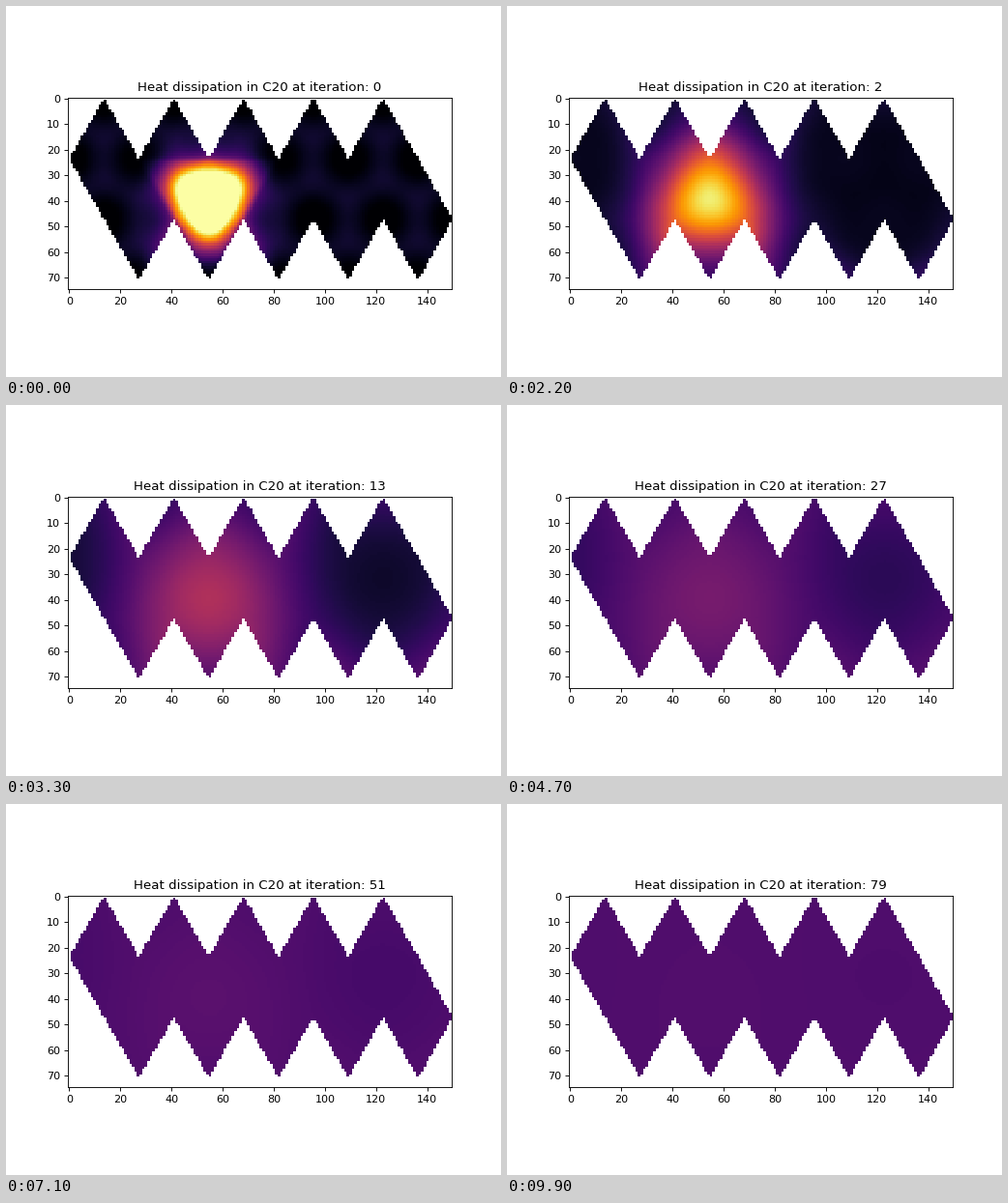
Recreate the animation shown at these times as a matplotlib script. Size 512 px wide and 384 px high, loop 10 s.

```python
import numpy as np
import matplotlib.pyplot as plt
from matplotlib.animation import FuncAnimation

W, H = 150, 75
HOLD, STEPS = 20, 80
SIDE = W / 5.5
ROW = SIDE * np.sqrt(3) / 2


def ring(turn, z):
    a = 2 * np.pi * turn / 5
    r = np.sqrt(1 - z * z)
    return np.array([r * np.cos(a), r * np.sin(a), z])


def vertex(row, col):
    """Net position and icosahedron corner; col counts triangle sides."""
    corners = [np.array([0, 0, 1.0]), ring(col, 5 ** -0.5),
               ring(col, -5 ** -0.5), np.array([0, 0, -1.0])]
    return (col * SIDE, row * ROW), corners[row]


def faces():
    for i in range(5):
        yield (0, i + .5), (1, i), (1, i + 1)
        yield (1, i), (2, i + .5), (1, i + 1)
        yield (1, i), (2, i - .5), (2, i + .5)
        yield (2, i + .5), (2, i + 1.5), (3, i + 1)
    yield (1, 5), (2, 4.5), (2, 5.5)


def fold_net(x, y):
    """Unit vector on the sphere for each net cell, NaN outside the net."""
    pts = np.full(x.shape + (3,), np.nan)
    cells = np.stack([x, y, np.ones_like(x)], -1)
    for face in faces():
        flat, solid = zip(*(vertex(*v) for v in face))
        if min(p[0] for p in flat) < -1:
            continue
        corners = np.column_stack([np.array(flat), np.ones(3)])
        bary = cells @ np.linalg.inv(corners)
        inside = (bary >= -1e-9).all(-1)
        pts[inside] = bary[inside] @ np.array(solid)
    return pts / np.linalg.norm(pts, axis=-1, keepdims=True)


def kernel(theta, s, degree=16):
    """Heat kernel on the unit sphere."""
    l = np.arange(degree)
    coef = (2 * l + 1) * np.exp(-l * (l + 1) * s)
    return np.polynomial.legendre.legval(np.cos(theta), coef)


x, y = np.meshgrid(np.arange(W, dtype=float), np.arange(H, dtype=float))
pts = fold_net(x, y)

# polar coordinates around the heated face
tip = vertex(1, 2)[1]
pole = tip + vertex(2, 1.5)[1] + vertex(2, 2.5)[1]
pole /= np.linalg.norm(pole)
e1 = tip - pole * (tip @ pole)
e1 /= np.linalg.norm(e1)
e2 = np.cross(pole, e1)
theta = np.arccos(np.clip(pts @ pole, -1, 1))
lobes = np.cos(3 * np.arctan2(pts @ e2, pts @ e1)) * (1 + np.cos(theta)) / 2

# ripple with icosahedral symmetry, 1 at the corners
axes = [np.array([0, 0, 1.0])] + [ring(i, 5 ** -0.5) for i in range(5)]
ripple = sum(np.polynomial.legendre.legval(pts @ a, [0] * 6 + [1])
             for a in axes) / 2.64

# depth inside the heated face joined with its three neighbours
dx, dy = x - 2 * SIDE, y - 5 * ROW / 3
c = np.sqrt(3) / 2
depth = 2 * ROW / 3 - np.maximum.reduce([-dy, c * dx + dy / 2, -c * dx + dy / 2])
patch = .6 + .4 * np.clip((depth + 1) / 2.5, 0, 1)


def start_field():
    heat = kernel(theta * (1 + .1 * lobes), .1) * patch
    return .045 + .19 * heat - .07 * ripple


def field(n):
    s = .14 + .0275 * n + .04 * (1 - np.exp(-n / 1.5))
    fade = np.exp(-n / 1.5)
    heat = kernel(theta * (1 - .15 * fade * lobes), s)
    return .045 + .19 * heat + .03 * fade * ripple


plt.rcParams["font.family"] = "DejaVu Sans"
fig, ax = plt.subplots(figsize=(6.4, 4.8), dpi=80)
image = ax.imshow(start_field(), cmap="inferno", vmin=0, vmax=1,
                  interpolation="nearest")
ax.set_xticks(range(0, W, 20))
ax.set_yticks(range(0, H, 10))
title = ax.set_title("")


def draw(i):
    n = max(i - HOLD, 0)
    image.set_data(start_field() if i < HOLD else field(n))
    title.set_text(f"Heat dissipation in C20 at iteration: {n}")
    return image, title


anim = FuncAnimation(fig, draw, frames=HOLD + STEPS, interval=100,
                     repeat=True, repeat_delay=0)
plt.show()
```
